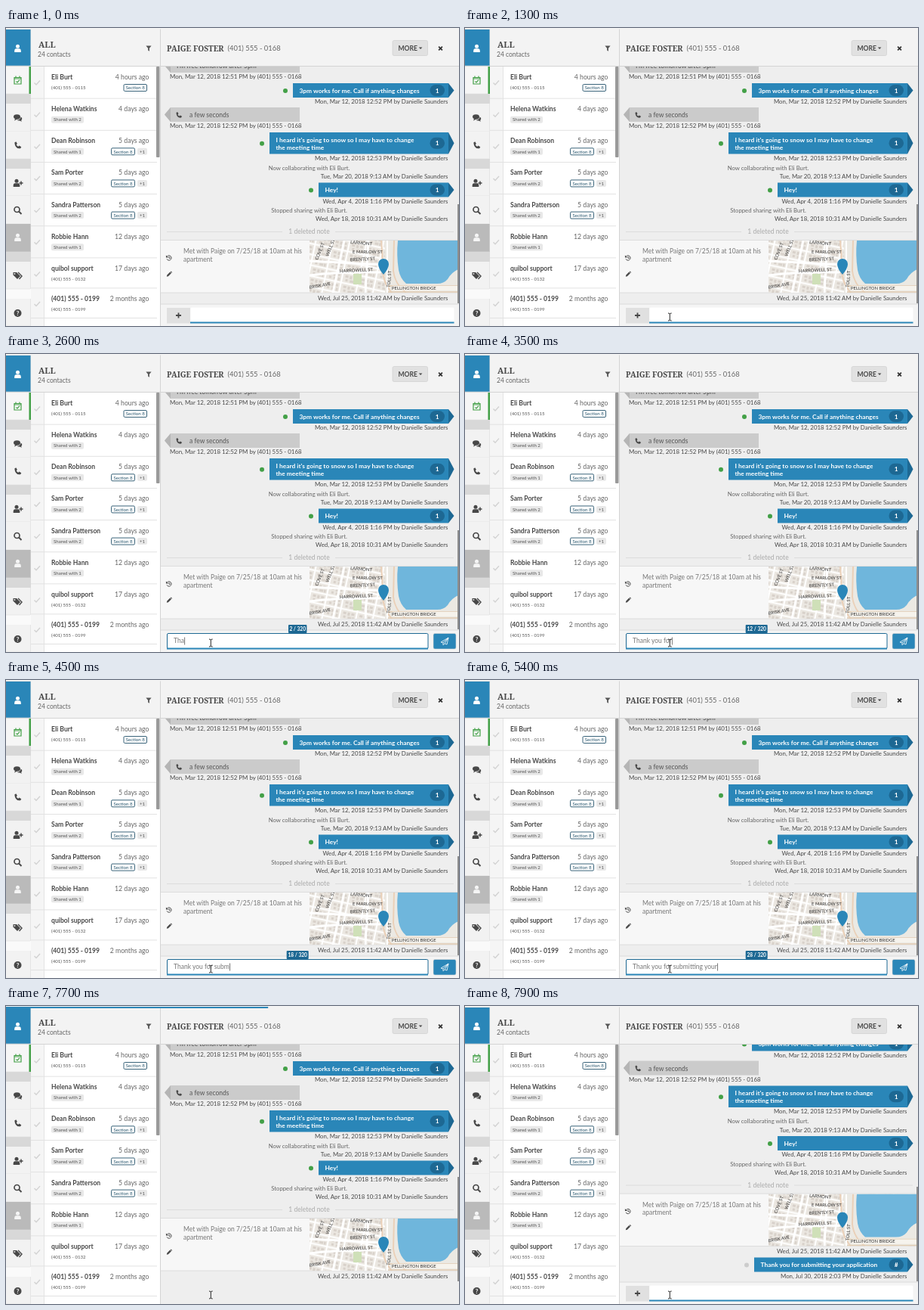
An HTML page for the animation above (8 s loop, 600 by 394 pixels).

```html
<!DOCTYPE html>
<html lang="en">
<head>
<meta charset="utf-8">
<title>Message inbox</title>
<style>
  html, body { margin: 0; width: 100%; height: 100%; overflow: hidden; background: #eee; }
  svg { display: block; width: 600px; height: 394px; font-family: Lato, sans-serif; }
  text { white-space: pre; }
  .b { font-weight: 700; }
  .slab { font-family: "Noto Serif", serif; font-weight: 700; }
  .end { text-anchor: end; }
  .mid { text-anchor: middle; }
</style>
</head>
<body>
<svg id="stage" viewBox="0 0 600 394"></svg>
<script>
const BLUE = '#2a86b8', DARK = '#1d6893', NAVY = '#24536b', GREEN = '#43a047', INK = '#484848', GREY = '#666';
const PHONE = '(401) 555 - 0168', AGENT = 'Danielle Saunders', FRIEND = 'Eli Burt';
const MESSAGE = 'Thank you for submitting your application';

const rect = (x, y, w, h, fill, more = '') =>
  `<rect x="${x}" y="${y}" width="${w}" height="${h}" fill="${fill}" ${more}/>`;
const text = (x, y, s, size = 8.5, fill = GREY, cls = '', more = '') =>
  `<text x="${x}" y="${y}" font-size="${size}" fill="${fill}" class="${cls}" ${more}>${s}</text>`;
const path = (d, fill, more = '') => `<path d="${d}" fill="${fill}" ${more}/>`;
const line = (d, stroke, width = 1, more = '') => path(d, 'none', `stroke="${stroke}" stroke-width="${width}" ${more}`);
const dot = (x, y, r, fill) => `<circle cx="${x}" cy="${y}" r="${r}" fill="${fill}"/>`;
const at = (x, y, body, size = 1) => `<g transform="translate(${x} ${y}) scale(${size})">${body}</g>`;

const icons = {
  user: c => dot(0, -2.8, 2.5, c) + path('M-4.3 5v-1.6q0-3.2 2.4-3.2h3.8q2.4 0 2.4 3.2v1.6z', c),
  phone: c => path('M-4.2-3.6l2-1.2 1.6 2.8-1.2 1.3q.9 1.7 2.5 2.5l1.3-1.2 2.8 1.6-1.2 2q-7 1-7.8-7.8z', c),
  calendar: c => line('M-4.5-3.5h9v8.5h-9zM-4.5-2h9M-2.5-5.5v2M2.5-5.5v2M-2 1.5l1.5 1.5 3-3.3', c, 1.2),
  chat: c => path('M-5.5-1.5a4.5 3.2 0 1 1 4.5 3.2l-3.5 1.8 1-2.3q-2-1-2-2.7z', c) +
    path('M4.2-1.5q2 1 1.5 3-.4 1-1.2 1.5l1 1.7-3-1.2q-2 .4-3.8-.7 5-.3 5.5-4.3z', c),
  userPlus: c => at(-1.5, 0, icons.user(c)) + line('M4.5-2.5v5M2 0h5', c, 1.5),
  search: c => `<circle cx="-1" cy="-1" r="3.5" fill="none" stroke="${c}" stroke-width="1.7"/>` + line('M1.5 1.5l3.5 3.5', c, 2),
  tags: c => path('M-6-4h4.5l5 5-4 4-5.5-5.5z', c) + line('M.5-4l5 5-3.5 4', c, 1.4) + dot(-4, -2, .9, '#f2f2f2'),
  help: c => dot(0, 0, 5, c) + text(0, 2.8, '?', 8, '#fff', 'b mid'),
  filter: c => path('M-4-4h8l-3 3.8v4.5l-2-1.5v-3z', c),
  history: c => line('M-3-2a3.5 3.5 0 1 1-.3 3.5M0-2v2.3h2', c, 1.1) + path('M-4.5-4v3.5h3.5z', c),
  pencil: c => path('M-4 4l.7-2.7 5-5 2 2-5 5zM2.3-4.2l.9-.8 2 2-.9.8z', c),
  close: c => line('M-2.4-2.4l4.8 4.8M2.4-2.4l-4.8 4.8', c, 1.8),
  plane: c => line('M-5 1l10-6-2 9-3-1.2-2 2v-3zM-2 1.8l7-6.8-5 7.8', c, .8, 'stroke-linejoin="round"')
};
const icon = (name, x, y, fill = INK, size = 1) => at(x, y, icons[name](fill), size);

function sidebar() {
  const cells = [
    [2, 48, BLUE, 'user', 27, '#fff'], [51, 36, '#f6f6f6', 'calendar', 69, GREEN],
    [100, 37, '#f2f2f2', 'chat', 119], [137, 36, '#f2f2f2', 'phone', 155],
    [186, 36, '#f2f2f2', 'userPlus', 205], [222, 37, '#f2f2f2', 'search', 241],
    [259, 37, '#bababa', 'user', 277, '#f5f5f5'], [309, 36, '#f2f2f2', 'tags', 327],
    [358, 36, '#f2f2f2', 'help', 377]
  ];
  return rect(0, 0, 33, 394, '#d8d8d8') + rect(0, 345, 33, 13, '#fafafa') +
    cells.map(([y, h, bg, name, cy, c]) => rect(0, y, 32.5, h, bg) + icon(name, 15.5, cy, c) +
      line(`M0 ${y + h}h32`, '#ddd', .6)).join('') +
    rect(30.5, 51, 2.5, 36, GREEN);
}

function pill(x, y, w, s, outlined) {
  const look = outlined ? `rx="1.5" stroke="${NAVY}" stroke-width=".9"` : 'rx="2"';
  return rect(x, y - 4.5, w, 9, outlined ? '#fff' : '#e8e8e8', look) +
    text(x + w / 2, y + 2.2, s, 6.1, outlined ? NAVY : '#555', 'mid');
}

function contacts() {
  const rows = [
    [FRIEND, '4 hours', '(401) 555 - 0115'], ['Helena Watkins', '4 days', 2],
    ['Dean Robinson', '5 days', 1, true], ['Sam Porter', '5 days', 2, true],
    ['Sandra Patterson', '5 days', 2, true], ['Robbie Hann', '12 days', 1],
    ['quibol support', '17 days', '(401) 555 - 0132'], ['(401) 555 - 0199', '2 months', '(401) 555 - 0199']
  ];
  let out = rect(33, 0, 171, 394, '#fff') + rect(33, 51, 17, 343, '#f5f5f5') + line('M50.5 51v343', '#e4e4e4');
  rows.forEach(([name, ago, info, tagged], i) => {
    const y = i < 7 ? 51 + i * 42.15 : 343.5, shared = typeof info === 'number';
    out += line(`M37.5 ${y + 21.5}l2.5 2.5 5-5.5`, '#d2d2d2', 1.4) +
      text(60, y + 17, name, 8.6, INK, 'b') + text(189.5, y + 17, ago + ' ago', 8.7, GREY, 'end') +
      (shared ? pill(60, y + 28, 43, 'Shared with ' + info) : text(60, y + 30, info, 6.1, '#555')) +
      (i === 0 ? pill(156, y + 28, 30.5, 'Section 8', true) : '') +
      (tagged ? pill(139.5, y + 28, 31, 'Section 8', true) + pill(174, y + 28, 13, '+1') : '') +
      line(`M33 ${y + (i < 6 ? 42.15 : 40)}h167`, '#e2e2e2');
  });
  return out + rect(199, 51, 4.5, 120, '#9a9a9a', 'rx="1"') +
    rect(33, 0, 171, 50, '#f3f3f3') + line('M33 50.5h171M204.5 0v394', '#d4d4d4') +
    text(43, 26, 'ALL', 11, INK, 'slab') + text(42, 38, '24 contacts', 8.5) + icon('filter', 189, 27, '#555', .9);
}

function outgoing(x, y, lines, badge, when, status = GREEN) {
  const h = lines.length > 1 ? 28.5 : 19, cy = y + h / 2;
  return dot(x - 10, cy + .5, 3, status) + rect(x, y, 586 - x, h, BLUE) +
    path(`M586 ${y}l7.5 ${h / 2}-7.5 ${h / 2}z`, DARK) +
    lines.map((s, i) => text(x + 8.5, y + 12.5 + i * 10.4, s, 8.4, '#fff', 'b')).join('') +
    rect(561.5, cy - 7.5, 19.5, 15, DARK, 'rx="7.5"') + text(571.2, cy + 3, badge, 8.4, '#fff', 'b mid') +
    stamp(y + h + 8.3, when);
}
const stamp = (y, when) => text(585.5, y, `${when} by ${AGENT}`, 7.85, INK, 'end');

const incoming = (y, body, when) =>
  path(`M210 ${y + 9.5}l8-9.5h171v19h-171z`, '#cbcbcb') + path(`M210 ${y + 9.5}l8-9.5v19z`, '#b5b5b5') + body +
  text(217, y + 27.3, `${when} by ${PHONE}`, 7.9, INK);

function map() {
  const streets = [
    [459, 297.5, 'E MARLOW ST', 0], [456, 308.5, 'BRENTLY ST', -3], [442, 323.5, 'HARROWELL ST', -3],
    [402, 345, 'BRISK AVE', -10], [456, 285, 'LARMONT', 5], [413, 307, 'COVE ST', -68],
    [427, 302, 'WELL ST', -68], [508.5, 343, 'TOLL ST', -85], [511, 345.5, 'PELLINGTON BRIDGE', 0]
  ];
  const houses = [[2, 2, 4, 3], [8, 2, 3, 4], [13, 2, 4, 3], [3, 7, 3, 3], [9, 7.5, 5, 3], [15, 7, 2.5, 4]];
  return `<defs><pattern id="blocks" width="22" height="14" patternUnits="userSpaceOnUse" patternTransform="rotate(12)">
    ${rect(0, 0, 22, 14, '#ebe7e1')}${houses.map(h => rect(...h, '#d8d1ca')).join('')}
    ${line('M0 12.8h22M20 0v14', '#fff', 2)}</pattern><clipPath id="mapClip">${rect(402, 281, 197, 69)}</clipPath></defs>
    <g clip-path="url(#mapClip)">${rect(402, 281, 197, 69, 'url(#blocks)')}
    ${rect(460, 325, 11, 14, '#cfe0b8')}${path('M502 281h97v69h-97z', '#ebe9e3')}
    ${path('M519 281h80v38q-9 4-14 13-5 6-14 6h-41q-8-7-10-18-3-20-1-39z', '#6fb6dc')}
    ${line('M402 327q45-5 95-4M402 308l95 5M448 281l-15 69M480 281l-4 69', '#fff', 3)}
    ${line('M497 281q2 20 2 38t12 31M514 281l-1 40q2 18 17 29', '#ead0b8', 2)}
    ${line('M505 281v69', '#fff', 2)}${line('M506 341h93M506 349h93', '#e2cdb4', 1.5)}${rect(512, 341, 87, 6, '#f6f3ed')}
    ${streets.map(([x, y, s, a]) => text(x, y, s, 5.9, '#333', '', `transform="rotate(${a} ${x} ${y})"`)).join('')}
    ${path('M500 326q-7-8-7-14a7 7 0 0 1 14 0q0 6-7 14z', BLUE)}</g>`;
}

const conversation = () =>
  incoming(40, text(226, 53, "I'm free tomorrow after 5pm", 8.5, INK), 'Mon, Mar 12, 2018 12:51 PM') +
  outgoing(380, 73, ['3pm works for me. Call if anything changes'], '1', 'Mon, Mar 12, 2018 12:52 PM') +
  incoming(105, icon('phone', 229, 115, INK, .85) + text(243, 118, 'a few seconds', 8.5, '#555'), 'Mon, Mar 12, 2018 12:52 PM') +
  outgoing(349, 138, ["I heard it's going to snow so I may have to change", 'the meeting time'], '1', 'Mon, Mar 12, 2018 12:53 PM') +
  text(401.5, 187.5, `Now collaborating with ${FRIEND}.`, 7.75, GREY, 'mid') + stamp(199.3, 'Tue, Mar 20, 2018 9:13 AM') +
  outgoing(414, 204.5, ['Hey!'], '1', 'Wed, Apr 4, 2018 1:16 PM') +
  text(401.5, 244, `Stopped sharing with ${FRIEND}.`, 7.75, GREY, 'mid') + stamp(255, 'Wed, Apr 18, 2018 10:31 AM') +
  line('M213 269.5h153M436 269.5h157', '#dcdcdc') + text(401.5, 272, '1 deleted note', 8.5, '#aaa', 'mid') +
  rect(205, 281, 395, 69, '#f7f7f7') + line('M205 280.5h395M205 350h395', '#ddd') +
  icon('history', 216, 304, INK, .9) + icon('pencil', 216, 325.5, INK, .8) +
  text(235, 298, 'Met with Paige on 7/25/18 at 10am at his', 8.5, '#777') + text(235, 308.5, 'apartment', 8.5, '#777') +
  map() + stamp(359.5, 'Wed, Jul 25, 2018 11:42 AM') +
  `<g id="reply">${outgoing(383, 365, [MESSAGE], '#', 'Mon, Jul 30, 2018 2:03 PM', '#ccc')}</g>`;

const composer = () => rect(205, 365, 395, 29, '#f4f4f4') + line('M205 365h395', '#dadada') +
  `<g id="plus">${rect(213, 370, 31, 20.5, '#e0e0e0')}${line('M225 380h7M228.5 376.5v7', INK, 1.8)}</g>
  <rect id="field" y="369.5" height="20" fill="#fff" rx="1.5" stroke="${DARK}"/>
  <path id="underline" stroke="${BLUE}" stroke-width="2"/>
  <g id="send"><rect id="sendBox" x="566" y="369.5" width="30" height="20.5" rx="2" stroke="#d5d5d5" stroke-width=".6"/>
  <g id="sendOff">${icon('plane', 581, 380, GREY)}</g><g id="sendOn">${icon('plane', 581, 380, '#fff')}</g></g>
  <g id="counter"><rect id="counterBox" y="358" height="11" fill="${DARK}" rx="1"/>
  ${text(386.2, 366, '', 6.6, '#fff', 'b mid', 'id="count"')}</g>
  ${text(222, 382.3, '', 8.5, '#777', '', 'id="typed"')}
  <path id="caret" stroke="#555" stroke-width=".8"/>`;

document.getElementById('stage').innerHTML = rect(0, 0, 600, 394, '#eee') +
  `<clipPath id="body">${rect(205, 51, 395, 343)}</clipPath>
  <g clip-path="url(#body)">${rect(205, 51, 395, 343, '#eee')}<g id="list">${conversation()}</g></g>` +
  `<rect id="thumb" x="598" width="2" fill="#8d8d8d"/>` +
  rect(205, 0, 395, 50, '#f3f3f3') + line('M205 50.5h395', '#d4d4d4') +
  text(213, 30.5, 'PAIGE FOSTER', 10.2, INK, 'slab') + text(293.5, 30, PHONE, 9.4) +
  rect(512, 16.5, 46.5, 20, '#e1e1e1', 'rx="2" stroke="#d2d2d2" stroke-width=".8"') +
  text(519.5, 29.6, 'MORE', 8.6, INK, 'b') + path('M546.8 25.5h4.6l-2.3 2.5z', INK) + icon('close', 575.5, 27, '#333') +
  `<g id="composer">${composer()}</g>` + sidebar() + contacts() + rect(0, 0, 600, 1.5, '#f4f4f4') +
  `<rect id="progress" y="1" height="2" fill="${BLUE}"/>
  <g id="pointer"><g id="arrow">${path('M0 0v11l2.5-2.3 2 4 1.7-.8-2-3.9h3.5z', '#222', 'stroke="#fff" stroke-width=".6"')}</g>
  <g id="beam">${line('M-2.3-5q2.3 0 2.3 1.5v7q0 1.5-2.3 1.5M2.3-5q-2.3 0-2.3 1.5M2.3 5q-2.3 0-2.3-1.5', '#222')}</g></g>`;

const el = {};
document.querySelectorAll('svg [id]').forEach(e => el[e.id] = e);
const set = (id, attrs) => { for (const k in attrs) el[id].setAttribute(k, attrs[k]); };
const show = (id, on) => { el[id].style.display = on ? '' : 'none'; };
const ease = (t, from, to) => {
  const p = Math.min(1, Math.max(0, (t - from) / (to - from)));
  return p * p * (3 - 2 * p);
};

// Typing rhythm: [time, letters typed so far]
const RHYTHM = [[2300, 0], [2500, 2], [3400, 12], [3500, 13], [4300, 17], [5200, 25],
  [5400, 29], [6100, 32], [6700, 40], [6800, 41], [8000, 41]];
function lettersAt(t) {
  const i = RHYTHM.findIndex(k => k[0] > t);
  if (i < 1) return 0;
  const [t0, n0] = RHYTHM[i - 1], [t1, n1] = RHYTHM[i];
  return Math.floor(n0 + (n1 - n0) * (t - t0) / (t1 - t0));
}

function draw(t) {
  const sent = t >= 7890, waiting = t >= 7500 && !sent;
  const open = sent ? 0 : ease(t, 1300, 1700), n = sent ? 0 : lettersAt(t);

  set('list', { transform: `translate(0 ${sent ? -32.5 : 0})` });
  show('reply', sent);
  const top = sent ? 239 : waiting ? 226 : 233;
  set('thumb', { y: top, height: 364 - top });

  show('composer', !waiting);
  const left = 244 - 31 * open, right = 593.5 - 34.5 * open;
  set('plus', { opacity: 1 - open });
  set('field', { x: left + .5, width: right - left - .5, 'stroke-opacity': open });
  set('underline', { d: `M${left} 389.5H${right}` });
  set('send', { opacity: open });
  set('sendBox', { fill: n ? BLUE : '#f8f8f8' });
  show('sendOff', !n);
  show('sendOn', n);

  show('counter', open === 1);
  const count = lettersAt(t - 50), half = count > 9 ? 14.5 : 12.2;
  el.count.textContent = count + ' / 320';
  set('counterBox', { x: 386.2 - half, width: 2 * half });
  el.typed.textContent = MESSAGE.slice(0, n);
  const end = 222.7 + (n ? el.typed.getComputedTextLength() : 0);
  set('caret', { d: `M${end} 374.5v10` });
  show('caret', open === 1 && (n || t % 1000 > 500));

  const move = ease(t, 700, 1200), y = 300 + 82 * move;
  show('pointer', t >= 700);
  set('pointer', { transform: `translate(${600 - 328.7 * move} ${y})` });
  show('arrow', y < 368);
  show('beam', y >= 368);

  set('progress', { width: t >= 7400 && !sent ? 346 * (t - 7400) / 300 : 0 });
}

function frame() {
  draw(Math.floor(performance.now() % 8000));
  requestAnimationFrame(frame);
}
frame();
</script>
</body>
</html>
```
